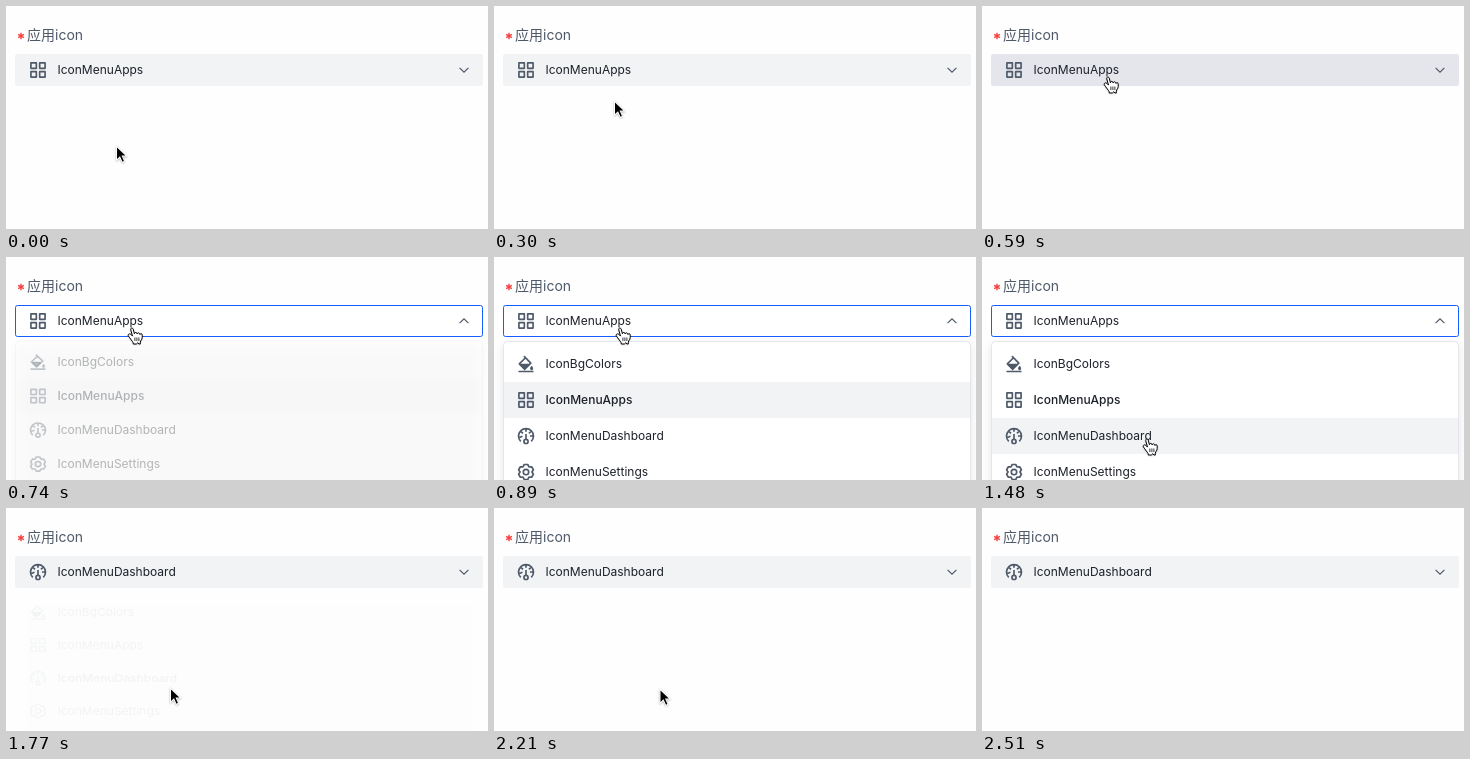
These frames come from a looping animation (482x223 px, 3.11 s). An HTML page with a canvas:

```html
<!DOCTYPE html>
<html lang="zh-CN">
<head>
<meta charset="utf-8">
<title>Icon select</title>
<style>
html, body { margin: 0; width: 100%; height: 100%; overflow: hidden; background: #fff; }
canvas { display: block; width: 482px; height: 223px; }
</style>
</head>
<body>
<canvas id="stage"></canvas>
<script>
const W = 482, H = 223, LOOP = 3110;
const FONT = 'Inter, "Noto Sans CJK SC", "Noto Sans CJK", sans-serif';
const INK = '#1d2129', SOFT = '#4e5969', FILL = '#f2f3f5', HOVER = '#e5e6eb', BLUE = '#165dff';
const ITEMS = ['IconBgColors', 'IconMenuApps', 'IconMenuDashboard', 'IconMenuSettings'];

const canvas = document.getElementById('stage');
const ctx = canvas.getContext('2d');
const dpr = window.devicePixelRatio || 1;
canvas.width = W * dpr;
canvas.height = H * dpr;

// Each step lasts until the next one; properties carry over.
const steps = [
  { t: 0, cur: 'arrow', x: 110, y: 139, picked: 1, open: 0, scale: 1, active: 1, hover: false },
  { t: 150, y: 122 },
  { t: 300, x: 120, y: 94 },
  { t: 440, cur: 'hand', x: 119, y: 76, hover: true },
  { t: 590, x: 121, y: 70 },
  { t: 740, open: 0.32, scale: 34 / 36 },
  { t: 890, open: 1, scale: 1 },
  { t: 1030, x: 154, y: 107, active: 0 },
  { t: 1180, x: 160, y: 140, active: 1 },
  { t: 1330, x: 159, y: 171, active: 2 },
  { t: 1480, x: 160, y: 181 },
  { t: 1770, cur: 'arrow', x: 164, y: 179, picked: 2, open: 0.045, scale: 33 / 36, hover: false, closing: true },
  { t: 2210, x: 165.5, y: 180, open: 0 },
  { t: 2360, x: 367, y: 220 },
  { t: 2510, cur: '' }
];

function stateAt(t) {
  return Object.assign({}, ...steps.filter(s => s.t <= t));
}

function text(str, x, y, size, color, weight = 400) {
  ctx.font = `${weight} ${size}px ${FONT}`;
  ctx.fillStyle = color;
  ctx.fillText(str, x, y);
}

function box(x, y, w, h, r, fill, line) {
  ctx.beginPath();
  ctx.roundRect(x, y, w, h, r);
  if (fill) { ctx.fillStyle = fill; ctx.fill(); }
  if (line) { ctx.strokeStyle = line; ctx.stroke(); }
}

function gear() {
  const p = new Path2D();
  for (let i = 0; i < 6; i++) {
    const a = i * Math.PI / 3 - Math.PI / 2;
    for (const [r, d] of [[18.5, -0.23], [18.5, 0.23], [14.3, Math.PI / 6]])
      p.lineTo(24 + r * Math.cos(a + d), 24 + r * Math.sin(a + d));
  }
  p.closePath();
  p.moveTo(30.5, 24);
  p.arc(24, 24, 6.5, 0, 7);
  return p;
}

// Icons live in a 48-unit square.
const icons = [
  { line: new Path2D('M19 5.25 35.5 21.75 20.5 36.7 8 23.75 22.75 9M9.4 25.25H32M6 42H42'),
    fill: new Path2D('M9.4 25.25 20.5 36.7 32 25.25ZM37.5 28C40 31 41.2 33 41.2 35A3.7 3.7 0 0 1 33.8 35C33.8 33 35 31 37.5 28Z') },
  { line: new Path2D('M7 7h13v13H7ZM28 7h13v13H28ZM7 28h13v13H7ZM28 28h13v13H28Z') },
  { line: new Path2D('M11.4 37A18 18 0 1 1 36.6 37M24 6v7.5M37.2 12 31 17.5M10.5 12.4 17 17.5M41.8 24H33.5M6.5 28 15.5 24.5M24 32V19M24 32a5 5 0 1 0 0 10a5 5 0 0 0 0-10Z') },
  { line: gear() }
];

function icon(i, cx, cy) {
  ctx.save();
  ctx.translate(cx - 10, cy - 10);
  ctx.scale(20 / 48, 20 / 48);
  ctx.lineWidth = 4;
  ctx.lineJoin = 'round';
  ctx.strokeStyle = ctx.fillStyle = SOFT;
  ctx.stroke(icons[i].line);
  if (icons[i].fill) ctx.fill(icons[i].fill);
  ctx.restore();
}

function label() {
  ctx.strokeStyle = '#f53f3f';
  ctx.lineWidth = 1.4;
  ctx.beginPath();
  for (const a of [Math.PI / 2, Math.PI / 6, -Math.PI / 6]) {
    const dx = 3.3 * Math.cos(a), dy = 3.3 * Math.sin(a);
    ctx.moveTo(15 - dx, 30 - dy);
    ctx.lineTo(15 + dx, 30 + dy);
  }
  ctx.stroke();
  text('应用icon', 21, 34, 14, SOFT);
}

function field(s) {
  const open = s.open > 0 && !s.closing;
  ctx.lineWidth = 1;
  if (open) box(9.5, 48.5, 467, 31, 2, '#fff', BLUE);
  else box(9, 48, 468, 32, 2, s.hover ? HOVER : FILL);
  icon(s.picked, 32, 64);
  text(ITEMS[s.picked], 51.5, 68, 12, INK);

  const d = open ? -2.2 : 2.2;
  ctx.strokeStyle = SOFT;
  ctx.lineWidth = 1.2;
  ctx.beginPath();
  ctx.moveTo(453.6, 64 - d);
  ctx.lineTo(458, 64 + d);
  ctx.lineTo(462.4, 64 - d);
  ctx.stroke();
}

function popup(s) {
  if (!s.open) return;
  ctx.save();
  ctx.globalAlpha = s.open;
  ctx.translate(0, 72 * (1 - s.scale));
  ctx.scale(1, s.scale);
  ctx.save();
  ctx.shadowColor = 'rgba(0,0,0,.1)';
  ctx.shadowBlur = 10 * dpr;
  ctx.shadowOffsetY = 4 * dpr;
  box(9, 84, 468, 200, 4, '#fff');
  ctx.restore();
  ctx.lineWidth = 1;
  box(9.5, 84.5, 467, 199, 4, null, HOVER);
  ITEMS.forEach((name, i) => {
    const y = 107 + 36 * i;
    if (i === s.active) box(10, y - 18, 466, 36, 0, FILL);
    icon(i, 32, y);
    text(name, 51.5, y + 4, 12, INK, i === s.picked ? 500 : 400);
  });
  ctx.restore();
}

const arrowRim = new Path2D('M0 0V16.4L3.7 12.9 6.2 18 9 16.9 6.7 11.6H11.7Z');
const arrowCore = new Path2D('M1 2.4V14L4 11.2 6.5 16.7 7.9 16.1 5.5 10.6H9.4Z');
const hand = new Path2D('M4.3 13C3.4 11.6 2.1 10 1.4 9C.7 8 1.6 6.9 2.6 6.9C3.7 6.9 4.6 8.2 5.5 9.1L3.8 3C3.4.9 5.3.2 6.2 2.1L7.4 6.7C7.4 5 9.9 4.9 10.2 7C10.4 5.3 12.7 5.4 13 7.5C13.4 6.1 15.2 6.4 15.2 8.1V10.6C15 13.2 13.4 13.3 13.3 15.2V17H11.9L10.8 15.7 9.4 17H6.3C6.4 15 5.2 14.4 4.3 13Z');
const creases = new Path2D('M7.9 10.5v3.6M9.9 10.5v3.6M11.9 10.5v3.6');

function cursor(s) {
  if (!s.cur) return;
  ctx.save();
  ctx.translate(s.x, s.y);
  ctx.save();
  ctx.shadowColor = 'rgba(0,0,0,.35)';
  ctx.shadowBlur = 2 * dpr;
  ctx.shadowOffsetY = 0.6 * dpr;
  ctx.fillStyle = '#fff';
  ctx.fill(s.cur === 'arrow' ? arrowRim : hand);
  ctx.restore();
  if (s.cur === 'arrow') {
    ctx.fillStyle = '#000';
    ctx.fill(arrowCore);
  } else {
    ctx.strokeStyle = '#000';
    ctx.lineJoin = 'round';
    ctx.lineWidth = 1;
    ctx.stroke(hand);
    ctx.lineWidth = 0.8;
    ctx.stroke(creases);
  }
  ctx.restore();
}

function draw(t) {
  const s = stateAt(t);
  ctx.setTransform(dpr, 0, 0, dpr, 0, 0);
  ctx.fillStyle = '#fefefe';
  ctx.fillRect(0, 0, W, H);
  label();
  field(s);
  popup(s);
  cursor(s);
}

const start = performance.now();
function tick() {
  draw((performance.now() - start) % LOOP);
  requestAnimationFrame(tick);
}
tick();
</script>
</body>
</html>
```
